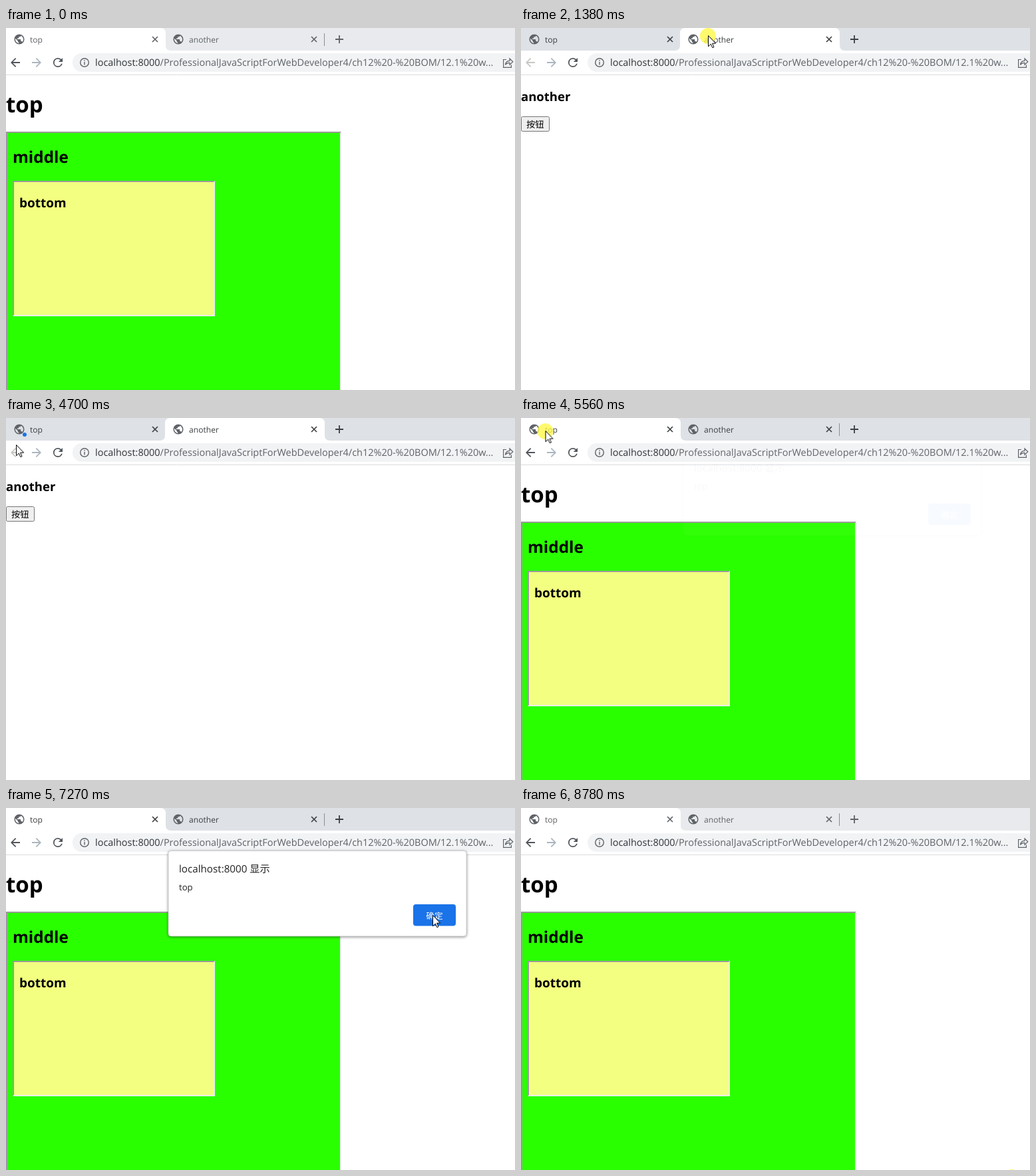
Recreate the animation shown at these times as an HTML page. Size 765 by 545 pixels, loop 8.83 s.

```html
<!DOCTYPE html>
<html lang="zh">
<head>
<meta charset="utf-8">
<title>top</title>
<style>
  html, body { margin: 0; width: 100%; height: 100%; overflow: hidden; background: #fff; }
  svg { display: block; width: 765px; height: 545px; text-rendering: geometricPrecision; }
  text { font-family: "Open Sans", "Noto Sans CJK SC", "Noto Sans CJK", sans-serif; white-space: pre; }
  .bold { font-weight: 700; }
  .tab-label { font-size: 12.1px; fill: currentColor; }
  .line { fill: none; stroke: currentColor; }

  /* Hard switches */
  .strip, .ink, .first, .second, .dot, .press, .hover-tab, .divider, .omnibox, .button, .back {
    animation: 8.83s step-end infinite;
  }
  .strip { animation-name: strip; }
  .ink { animation-name: ink; }
  .first { animation-name: first; }
  .second { animation-name: second; }
  .dot { animation-name: dot; }
  .press { animation-name: press; }
  .hover-tab { animation-name: hover-tab; }
  .divider { animation-name: divider; }
  .omnibox { animation-name: omnibox; }
  .button { animation-name: button; }
  .back { animation-name: back; }

  @keyframes strip { 0%, 99.43% { fill: #e8eaed } 15.17% { fill: #dee1e6 } 100% { fill: #e8eaed } }
  @keyframes ink { 0%, 99.43% { color: #5f6368 } 15.17% { color: #3c4043 } 100% { color: #5f6368 } }
  @keyframes first { 0%, 62.4%, 100% { opacity: 1 } 15.17% { opacity: 0 } }
  @keyframes second { 0%, 62.4%, 100% { opacity: 0 } 15.17% { opacity: 1 } }
  @keyframes back { 0%, 62.4%, 100% { fill: #50555a } 15.17% { fill: #c5c7c3 } }
  @keyframes dot { 0%, 62.4%, 100% { opacity: 0 } 37.03% { opacity: 1 } }
  @keyframes press {
    0%, 16.3%, 37.93%, 63.98%, 81.53% { opacity: 0 }
    15.17%, 37.03%, 62.4%, 80.4%, 99.43%, 100% { opacity: .8 }
  }
  @keyframes hover-tab { 0%, 15.17%, 100% { opacity: 0 } 11.6% { opacity: 1 } }
  @keyframes divider { 0%, 62.4%, 100% { opacity: 1 } 11.6% { opacity: 0 } }
  @keyframes omnibox {
    0%, 11.1%, 30.6%, 72.1%, 100% { fill: #f1f3f4 }
    10.4%, 29.5%, 71% { fill: #e8eaed }
  }
  @keyframes button {
    0%, 49.6%, 100% { fill: #efefef; stroke: #767676 }
    35% { fill: #e3e3e3; stroke: #4f4f4f }
  }

  /* Movement */
  .cursor { animation: cursor 8.83s ease-in-out infinite; }
  @keyframes cursor {
    0%, 3.05% { transform: translate(737px, 555px) }
    12.8%, 26.6% { transform: translate(281px, 11px) }
    35.3%, 48.9% { transform: translate(25px, 139px) }
    53.2% { transform: translate(15px, 40px) }
    55.2%, 58.4% { transform: translate(25px, 31px) }
    60.7%, 69.05% { transform: translate(36.5px, 19px) }
    76.5%, 87.85% { transform: translate(641px, 161px) }
    96.8%, 100% { transform: translate(737px, 555px) }
  }
  .dialog { animation: dialog 8.83s linear infinite; }
  @keyframes dialog {
    0%, 62.91% { opacity: 0; transform: translateY(-17px) }
    65%, 82.34% { opacity: 1; transform: none }
    83.98%, 100% { opacity: 0; transform: translateY(-13px) }
  }
  .sheet { filter: drop-shadow(0 1px 2px rgba(0, 0, 0, .45)); }
</style>
</head>
<body>
<svg viewBox="0 0 765 545">
  <defs>
    <path id="tab" d="M-8 34q8 0 8-8V8q0-8 8-8H232q8 0 8 8V26q0 8 8 8Z"/>
    <path id="globe" transform="scale(.75) translate(-12 -12)" fill="#5f6368" d="M12 2C6.48 2 2 6.48 2 12s4.48 10 10 10 10-4.48 10-10S17.52 2 12 2zm-1 17.93c-3.95-.49-7-3.85-7-7.93 0-.62.08-1.21.21-1.79L9 15v1c0 1.1.9 2 2 2v1.93zm6.9-2.54c-.26-.81-1-1.39-1.9-1.39h-1v-3c0-.55-.45-1-1-1H8v-2h2c.55 0 1-.45 1-1V7h2c1.1 0 2-.9 2-2v-.41c2.93 1.19 5 4.06 5 7.41 0 2.08-.8 3.97-2.1 5.39z"/>
    <path id="close" class="line" stroke-width="1.7" d="M-4-4 4 4M4-4-4 4"/>
    <path id="arrow" d="M7 -.9H-3.6L1.3-5.8 0-7-7 0 0 7 1.3 5.8-3.6.9H7Z"/>
  </defs>

  <!-- Tab strip -->
  <rect class="strip" width="765" height="34" fill="#e8eaed"/>
  <use class="hover-tab" href="#tab" x="239" fill="#f3f4f6"/>
  <g class="first" fill="#fff">
    <rect width="20" height="34"/>
    <use href="#tab"/>
  </g>
  <use class="second" href="#tab" x="239" fill="#fff"/>
  <path class="divider" d="M478.5 8V27" stroke="#8a8d91"/>
  <use href="#globe" x="0" y="0" transform="translate(20 17)"/>
  <use href="#globe" transform="translate(259 17)"/>
  <circle class="dot" cx="28" cy="25" r="3" fill="#1a73e8"/>
  <g class="ink">
    <text class="tab-label" x="36" y="21.5">top</text>
    <text class="tab-label" x="275" y="21.5">another</text>
    <use href="#close" x="224" y="17"/>
    <use href="#close" x="463" y="17"/>
    <path class="line" stroke-width="1.8" d="M495 17H507M501 11V23"/>
  </g>

  <!-- Toolbar -->
  <rect y="34" width="765" height="36" fill="#fff"/>
  <path d="M0 70.5H765" stroke="#dadce0"/>
  <use class="back" href="#arrow" x="14" y="52"/>
  <use href="#arrow" transform="translate(46 52) scale(-1 1)" fill="#abb5bf"/>
  <path transform="translate(78 52) scale(.88) translate(-12 -12)" fill="#50555a" d="M17.65 6.35A7.96 7.96 0 0 0 12 4a8 8 0 1 0 7.73 10h-2.08A6 6 0 1 1 12 6c1.66 0 3.14.69 4.22 1.78L13 11h7V4z"/>
  <rect class="omnibox" x="100" y="38" width="700" height="28" rx="14"/>
  <g fill="none" stroke="#5f6368" stroke-width="1.4">
    <circle cx="118" cy="52" r="6.3"/>
    <path d="M118 51V55.6M118 48.2V49.8"/>
    <path stroke-width="1.2" d="M752 47.5H747.6V59.3H759.4V55.5M750.5 55.5c.4-4.2 3-6 6.5-6.2V46l4.8 4.8L757 55.4V52.3c-3 0-5 1-6.5 3.2Z"/>
  </g>
  <text x="134" y="57" font-size="14.47" fill="#5f6368"><tspan fill="#2f3337">localhost:8000</tspan>/ProfessionalJavaScriptForWebDeveloper4/ch12%20-%20BOM/12.1%20w...</text>

  <!-- Nested frames page -->
  <g class="first">
    <text class="bold" x="0" y="126.5" font-size="33">top</text>
    <rect y="156" width="504" height="400" fill="#ededed"/>
    <path d="M0 156H504L502 158H2V545H0Z" fill="#9a9a9a"/>
    <rect x="2" y="158" width="500" height="400" fill="#2aff00"/>
    <text class="bold" x="10" y="203" font-size="24.3">middle</text>
    <rect x="10" y="230" width="304" height="204" fill="#ededed"/>
    <path d="M10 230H314L312 232H12V432L10 434Z" fill="#9a9a9a"/>
    <rect x="12" y="232" width="300" height="200" fill="#f3ff80"/>
    <text class="bold" x="20" y="270" font-size="19">bottom</text>
  </g>

  <!-- Button page -->
  <g class="second">
    <text class="bold" x="0" y="110" font-size="18.5">another</text>
    <rect class="button" x=".5" y="133.5" width="42" height="22" rx="2"/>
    <text x="8" y="150" font-size="13.33">按钮</text>
  </g>

  <!-- Alert -->
  <g class="dialog">
    <rect class="sheet" x="244" y="64.5" width="448" height="128.5" rx="4" fill="#fff" stroke="#c4c6c9" stroke-width=".8"/>
    <text x="260" y="97" font-size="15.2" fill="#202124">localhost:8000 显示</text>
    <text x="260" y="124" font-size="13.2" fill="#202124">top</text>
    <rect x="612" y="145" width="64" height="32.5" rx="4" fill="#1a73e8"/>
    <text x="644" y="166.5" font-size="12.7" fill="#fff" text-anchor="middle">确定</text>
  </g>

  <g class="cursor">
    <circle class="press" cx="0" cy="1" r="12" fill="#fff84a"/>
    <path d="M.5.5V16.8L4.3 13.2 6.8 18.7 9 17.7 6.6 12.2H11.6Z" fill="#fff" stroke="#000"/>
  </g>
</svg>
</body>
</html>
```
